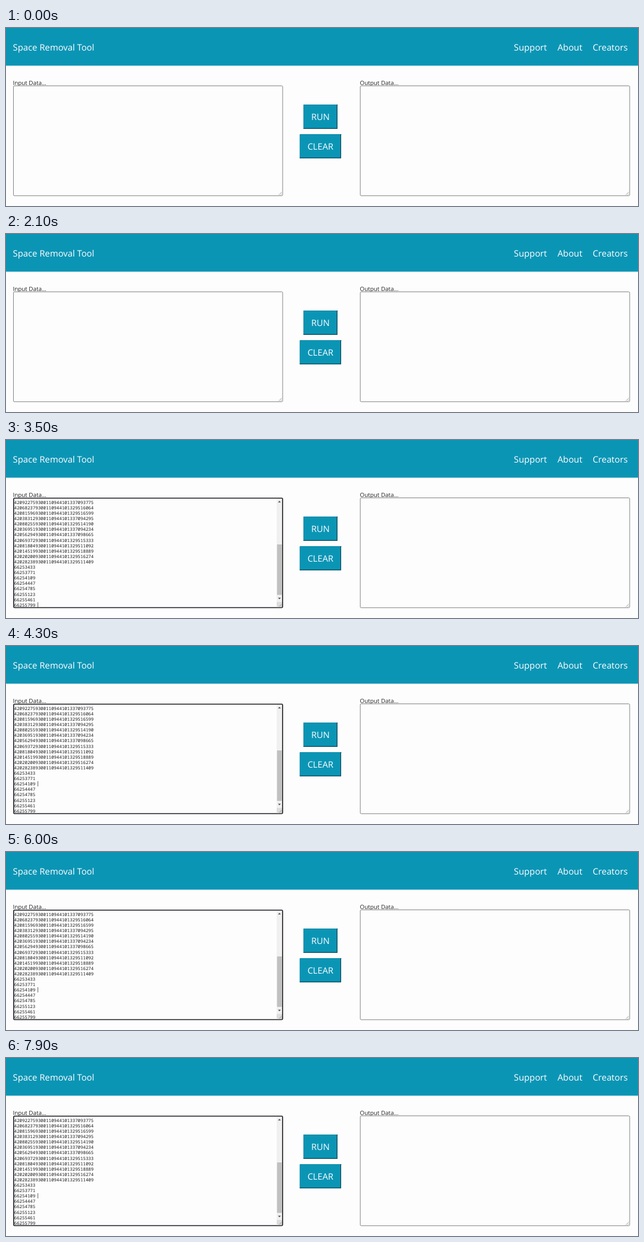
Animation of 1060 by 300 pixels, one loop 8000 ms. Source, as an HTML page:

```html
<!DOCTYPE html>
<html lang="en">
<head>
<meta charset="utf-8">
<title>Space Removal Tool</title>
<style>
  html, body { margin: 0; width: 100%; height: 100%; overflow: hidden; background: #fefdfe; }
  svg { display: block; width: 1060px; height: 300px; }
  text { font-family: "Open Sans", sans-serif; font-size: 14.8px; fill: #fff; text-rendering: geometricPrecision; }
  .label { font-size: 9.85px; fill: #222; }
  #lines text { font-family: "Noto Sans Mono", monospace; font-size: 7.42px; fill: #1c1c1c; }
  .box { fill: #fefdfe; stroke: #858585; }
  .box.focused { stroke: #1c1c20; stroke-width: 1.6; x: 12.9px; y: 98px; width: 451px; height: 184.5px; }
  .grip { fill: none; stroke: #8c8c8c; stroke-width: .8; }
  .teal { fill: #0b95b5; }
  .lit, .shade { fill: none; stroke: #0a86a3; }
  .shade { stroke: #084858; stroke-width: 1.2; }
  .button text { font-size: 14.67px; text-anchor: middle; }
</style>
</head>
<body>
<svg viewBox="0 0 1060 300">
  <defs>
    <clipPath id="inside"><rect x="13" y="98.5" width="440" height="183.5"/></clipPath>
    <path id="grip" class="grip" d="M457.5 281.5l5-5M460.5 281.5l2-2"/>
  </defs>

  <rect class="teal" width="1060" height="63.5"/>
  <text x="11.6" y="37.5">Space Removal Tool</text>
  <text x="851.8" y="37.5">Support</text>
  <text x="925" y="37.5">About</text>
  <text x="984" y="37.5">Creators</text>

  <text class="label" x="11.4" y="96.4">Input Data...</text>
  <text class="label" x="593.6" y="96.4">Output Data...</text>
  <rect class="box" id="input" x="12.5" y="97.5" width="451.5" height="185.2" rx="1.5"/>
  <rect class="box" x="594.2" y="97.5" width="451.8" height="185.2" rx="1.5"/>

  <g id="filled">
    <rect x="454" y="99" width="9" height="174" fill="#f1f0f1"/>
    <rect x="454" y="273" width="9" height="8.7" fill="#dcdcdc"/>
    <rect x="454.6" y="176" width="8" height="85" fill="#c1c0c1"/>
    <path d="M456.2 105.3l2.4-2.8 2.4 2.8zM456.2 265.8l2.4 2.8 2.4-2.8z" fill="#505050"/>
    <g id="lines" clip-path="url(#inside)"></g>
  </g>
  <rect id="selection" x="49.5" y="219" width="4.6" height="9" fill="#2f8cf2"/>
  <rect id="caret" width="1" fill="#666"/>

  <use href="#grip"/>
  <use href="#grip" x="582"/>
  <g id="buttons"></g>
</svg>
<script>
const LOOP = 8000, FOCUS = 2500, PASTE = 3300, CLICK = 4000, SELECT = 6600, RECLICK = 7500;
const ROW = 9.105, FIRST_BASELINE = 107.8;
const LONG_ROWS = 12, ROWS = 20, CLICKED_ROW = 14;

const el = id => document.getElementById(id);
const show = (id, visible) => el(id).setAttribute("visibility", visible ? "visible" : "hidden");
const rowBaseline = row => FIRST_BASELINE + row * ROW;

let seed = 7;
function random() {
  seed = (seed * 16807) % 2147483647;
  return seed / 2147483647;
}
const digits = count => Array.from({ length: count }, () => Math.floor(random() * 10)).join("");

// Long codes share their middle part; short ones count upwards.
function rowText(row) {
  if (row < LONG_ROWS) {
    const batch = random() < .5 ? "33709" : "32951";
    return `420${digits(5)}9300110944101${batch}${digits(4)}`;
  }
  return String(66253433 + (row - LONG_ROWS) * 338);
}

function button(label, centerY, width, height) {
  const left = 527.4 - width / 2, top = centerY - height / 2;
  return `<g class="button">
    <rect class="teal" x="${left}" y="${top}" width="${width}" height="${height}"/>
    <path class="lit" d="M${left + .5} ${top + height}V${top + .5}h${width}"/>
    <path class="shade" d="M${left} ${top + height - .6}h${width - .6}V${top}"/>
    <text x="527.3" y="${centerY + 5.5}">${label}</text></g>`;
}

el("buttons").innerHTML = button("RUN", 149.5, 57, 41) + button("CLEAR", 199.2, 69.3, 40.5);
el("lines").innerHTML = Array.from({ length: ROWS }, (_, row) =>
  `<text x="13.7" y="${rowBaseline(row)}">${rowText(row)}</text>`).join("");

function placeCaret(x, y) {
  const caret = el("caret");
  caret.setAttribute("x", x);
  caret.setAttribute("y", y);
  caret.setAttribute("height", 8.7);
}

function draw(t) {
  const pasted = t >= PASTE;
  const selecting = t >= SELECT && t < RECLICK;
  el("input").classList.toggle("focused", t >= FOCUS);
  show("filled", pasted);
  show("selection", selecting);

  if (pasted) placeCaret(53, rowBaseline(t < CLICK ? ROWS - 1 : CLICKED_ROW) - 7.4);
  else placeCaret(13.6, 99);

  // The blink restarts with every action that moves the caret.
  const since = t - [RECLICK, CLICK, PASTE, FOCUS].find(start => t >= start);
  show("caret", since % 1000 < 500 && !selecting);
}

function tick() {
  draw(performance.now() % LOOP);
  requestAnimationFrame(tick);
}
tick();
</script>
</body>
</html>
```
